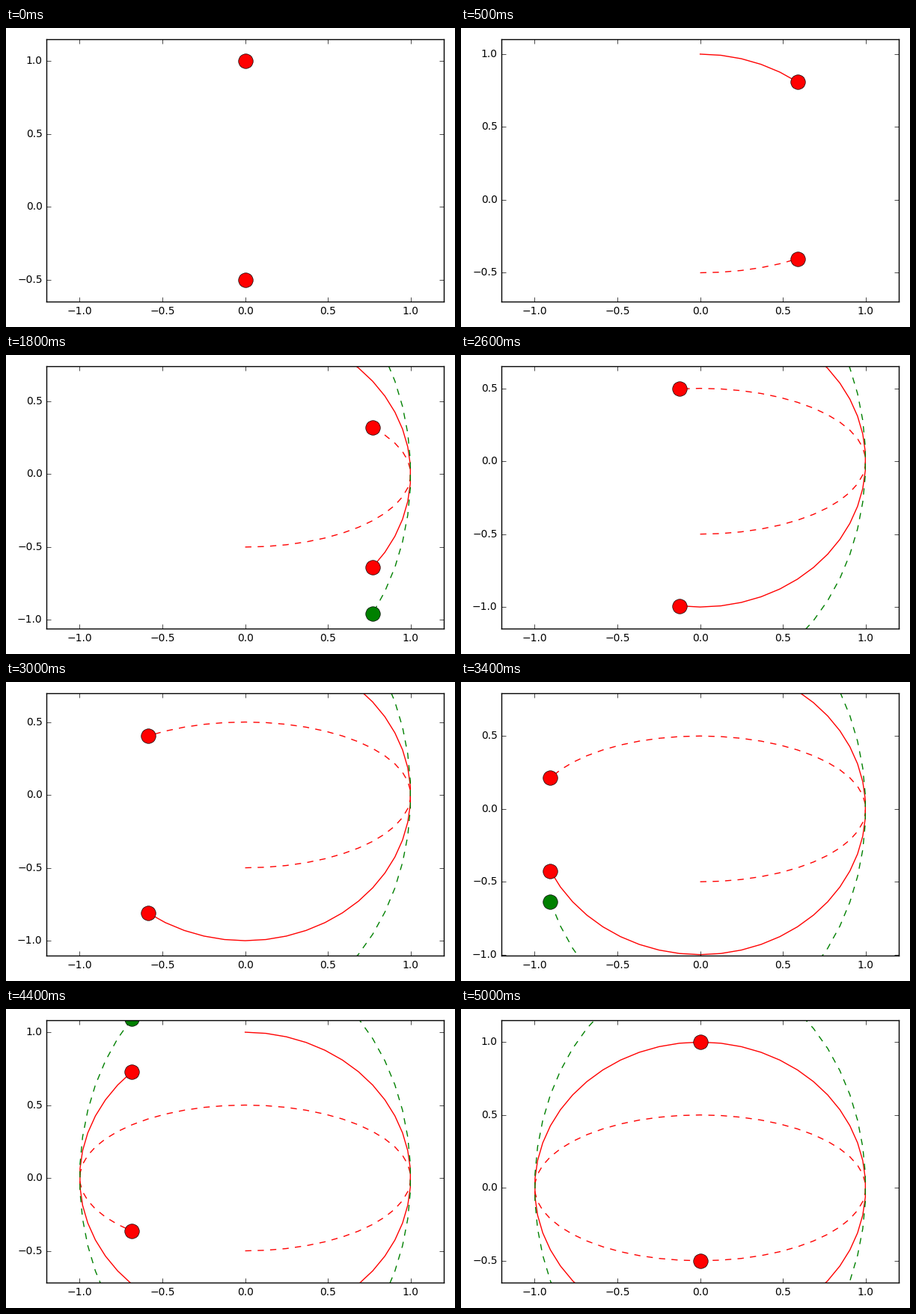
These frames come from a looping animation (600 by 400 pixels, 5100 ms). A matplotlib script:

```python
import matplotlib.pyplot as plt
import numpy as np
from matplotlib.animation import FuncAnimation
from matplotlib.ticker import MultipleLocator

STEPS = 50
WIDTH, HEIGHT, DPI = 600, 400, 100

plt.style.use("classic")
plt.rcParams.update({
    "font.family": "DejaVu Sans",
    "font.size": 10,
    "figure.facecolor": "white",
    "savefig.facecolor": "white",
    "figure.dpi": DPI,
    "savefig.dpi": DPI,
})

fig = plt.figure(figsize=(WIDTH / DPI, HEIGHT / DPI), dpi=DPI)
left, right, bottom, top = 54.2, 585, 34, 385
ax = fig.add_axes([left / WIDTH, bottom / HEIGHT,
                   (right - left) / WIDTH, (top - bottom) / HEIGHT])
ax.set_xlim(-1.2, 1.2)
ax.xaxis.set_major_locator(MultipleLocator(0.5))
ax.yaxis.set_major_locator(MultipleLocator(0.5))

theta = np.linspace(0, 2 * np.pi, STEPS + 1)
xs = np.sin(theta)


def add_body(amplitude, color, style):
    """Create a trail and the ball that leads it."""
    trail, = ax.plot([], [], style, color=color, lw=1)
    ball, = ax.plot([], [], "o", color=color, ms=14, mew=0.5, mec="black")
    return amplitude * np.cos(theta), trail, ball


bodies = [
    add_body(1.0, "red", "-"),
    add_body(-0.5, "red", "--"),
    add_body(1.5, "green", "--"),
]


def draw(i):
    for ys, trail, ball in bodies:
        trail.set_data(xs[:i + 1], ys[:i + 1])
        ball.set_data([xs[i]], [ys[i]])
    # The view follows the midpoint of the two red balls.
    center = (bodies[0][0][i] + bodies[1][0][i]) / 2
    ax.set_ylim(center - 0.9, center + 0.9)
    return [artist for body in bodies for artist in body[1:]]


anim = FuncAnimation(fig, draw, frames=STEPS + 1, interval=100,
                     init_func=lambda: draw(0), repeat=True, repeat_delay=0)
plt.show()
```
